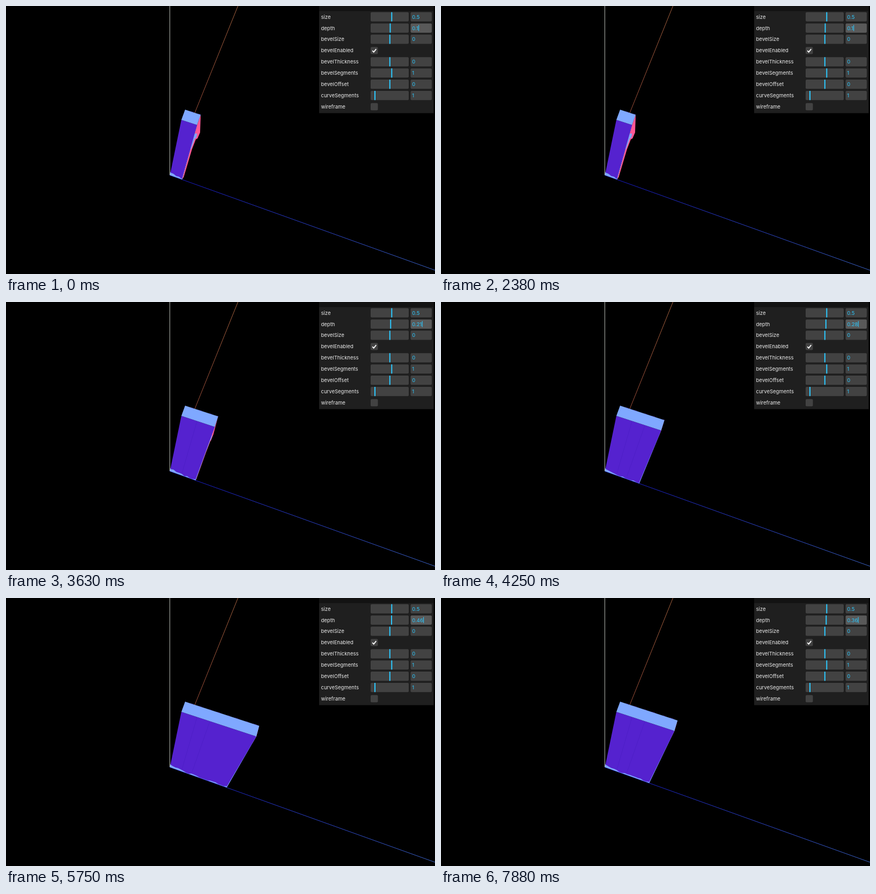
An HTML page that plays this animation: 800 px wide and 499 px high, repeating every 8000 ms.

```html
<!DOCTYPE html>
<html lang="en">
<head>
<meta charset="utf-8">
<title>Extrude depth</title>
<style>
  html, body { margin: 0; width: 100%; height: 100%; overflow: hidden; background: #000; }
  svg { display: block; width: 800px; height: 499px; }
  text { font: 9.5px Inter, Roboto, sans-serif; fill: #ebebeb; white-space: pre; }
  .field { fill: #424242; }
  .focus { fill: #595959; }
  .accent { fill: #2cc9ff; }
</style>
</head>
<body>
<svg id="stage" viewBox="0 0 800 499" xmlns="http://www.w3.org/2000/svg">
  <defs>
    <linearGradient id="zAxis" gradientUnits="userSpaceOnUse" x1="306" y1="315" x2="800" y2="492">
      <stop stop-color="#1414c0"/><stop offset="1" stop-color="#3a62c4"/>
    </linearGradient>
    <linearGradient id="xAxis" gradientUnits="userSpaceOnUse" x1="352" y1="199" x2="432" y2="0">
      <stop stop-color="#9a4c38"/><stop offset="1" stop-color="#a4623f"/>
    </linearGradient>
  </defs>
  <rect width="800" height="499"/>
  <g fill="none">
    <path d="M305.5 315V0" stroke="#b4b8b0"/>
    <path d="M352 199L432.5 0" stroke="url(#xAxis)"/>
    <path d="M305.5 315L800 492" stroke="url(#zAxis)"/>
  </g>
  <g id="solid">
    <polygon id="face" fill="#ff5795"/>
    <polygon id="inner" fill="#7fa5fb"/>
    <polygon id="under" fill="#7fa8ff"/>
    <polygon id="side" fill="#5522cf"/>
    <path id="seams" stroke="#4a1dc2" stroke-opacity=".6" fill="none"/>
    <polygon id="top" fill="#7fa8ff"/>
    <path id="rim" stroke="#6a63d8" stroke-opacity=".7" stroke-dasharray="5 9 8 14" fill="none"/>
  </g>
  <g id="panel">
    <rect x="584" width="213.5" height="199.5" fill="#1f1f1f"/>
    <rect x="584" width="213.5" height="9.5" fill="#131313"/>
  </g>
</svg>
<script>
const $ = id => document.getElementById(id);
const panel = $('panel');

function add(tag, attrs, content = '') {
  const el = document.createElementNS('http://www.w3.org/2000/svg', tag);
  for (const name in attrs) el.setAttribute(name, attrs[name]);
  el.textContent = content;
  return panel.appendChild(el);
}

// label, value; a boolean becomes a checkbox
const rows = [
  ['size', 0.5, 719.3], ['depth', 0.1, 716.4], ['bevelSize', 0, 715.8], ['bevelEnabled', true],
  ['bevelThickness', 0, 715.8], ['bevelSegments', 1, 719.3], ['bevelOffset', 0, 715.8],
  ['curveSegments', 1, 688], ['wireframe', false]
];
let depthThumb, depthText;

rows.forEach(([label, value, thumbX], i) => {
  const y = 20.1 + i * 20.93;
  add('text', { x: 587.5, y: y + 3.5 }, label);
  if (typeof value === 'boolean') {
    add('rect', { class: 'field', x: 680, y: y - 6.7, width: 13.5, height: 13.4, rx: 2 });
    if (value) add('path', { d: `M683.3 ${y + .3}l2.4 2.6 4.6-5.6`, fill: 'none', stroke: '#fff', 'stroke-width': 1.8 });
    return;
  }
  const isDepth = label === 'depth';
  add('rect', { class: 'field', x: 680, y: y - 8.6, width: 71, height: 17.2, rx: 2 });
  const thumb = add('rect', { class: 'accent', x: thumbX - 1, y: y - 8.6, width: 2, height: 17.2 });
  add('rect', { class: isDepth ? 'focus' : 'field', x: 754.5, y: y - 8.6, width: 39.5, height: 17.2, rx: 2 });
  const text = add('text', { class: 'accent', x: 757.3, y: y + 3.5 }, String(value));
  if (isDepth) [depthThumb, depthText] = [thumb, text];
});
const caret = add('rect', { class: 'accent', y: 35.5, width: 1.1, height: 11 });

// Held arrow key: one press, a pause, then repeats
const REPEAT = 1000 / 12;
const repeats = (t, start) => Math.floor((t - start) / REPEAT);

function depthAt(t) {
  if (t < 2500) return 10;
  if (t < 2870) return 11;
  if (t < 6375) return Math.min(50, 12 + repeats(t, 2870));
  if (t < 6870) return 49;
  return 48 - repeats(t, 6870);
}

// Perspective slide of a corner along the depth axis
const slide = (x, y, dx, dy, k, d) => [x + dx * d / (1 - k * d), y + dy * d / (1 - k * d)];
const topBack = d => slide(334, 193, 288, 94, .09, d);
const topFront = d => slide(327, 212, 290, 95, .1, d);
const base = d => slide(305.5, 315, 228, 81, .03, d);
const shift = ([x, y], dx, dy) => [x + dx, y + dy];
const setPoints = (id, list) => $(id).setAttribute('points', list.map(p => p.join()).join(' '));
const hash = n => { const s = Math.sin(n) * 43758.5453; return s - Math.floor(s); };

function raggedEdge(step, end) {
  const points = [], start = base(0), length = end[0] - start[0];
  for (let x = length - 1; x > 2; x -= 5) {
    const y = start[1] + (end[1] - start[1]) * x / length;
    const h = hash(Math.round(x / 5) * 12.99 + step * 78.2);
    const inset = Math.max(0, 4.3 - x / 6) + (h > .6 ? 2.4 * h : .5);
    points.push([start[0] + x, y - inset]);
  }
  return points;
}

function draw(step) {
  const d = step / 100;
  const back = topBack(d), front = topFront(d), foot = base(d);
  setPoints('top', [[334, 193], back, front, [327, 212]]);
  setPoints('under', [[306.5, 309.5], front, foot, [305.5, 315]]);
  setPoints('side', [[327, 212], front, shift(foot, -.3, -1.5), ...raggedEdge(step, foot), [306.7, 310]]);

  // The lettered face shows until the solid hides it
  const open = Math.max(0, 1 - (d - .1) / .15);
  const slope = (foot[0] - front[0]) / (foot[1] - front[1]);
  const beside = (dy, out) => shift(front, slope * dy + out * open, dy);
  setPoints('face', [front, back, beside(14, 9.5), beside(25, 7.8), beside(27, 5),
    beside(45, 3), beside(62, 2.6), beside(97, 1.8), foot]);
  setPoints('inner', [beside(16, 0), beside(16, 4.5), beside(24, 5), beside(25, 2.8), beside(45, 1.2), beside(45, 0)]);

  const seam = at => {
    const a = topFront(at), b = base(at);
    return `M${a}L${shift(b, 0, -5)}`;
  };
  $('seams').setAttribute('d', [.1, .18].filter(at => d > at + .06).map(seam).join('') || 'M0 0');
  $('rim').setAttribute('d', `M345 196.8L${back}`);

  depthText.textContent = String(d);
  depthThumb.setAttribute('x', 714.8 + 7 * d);
  caret.setAttribute('x', 757.5 + depthText.getComputedTextLength());
}

let shown = -1;
function frame() {
  const t = performance.now() % 8000;
  const step = depthAt(Math.floor(t / 125) * 125);
  if (step !== shown) draw(shown = step);
  requestAnimationFrame(frame);
}
frame();
</script>
</body>
</html>
```
